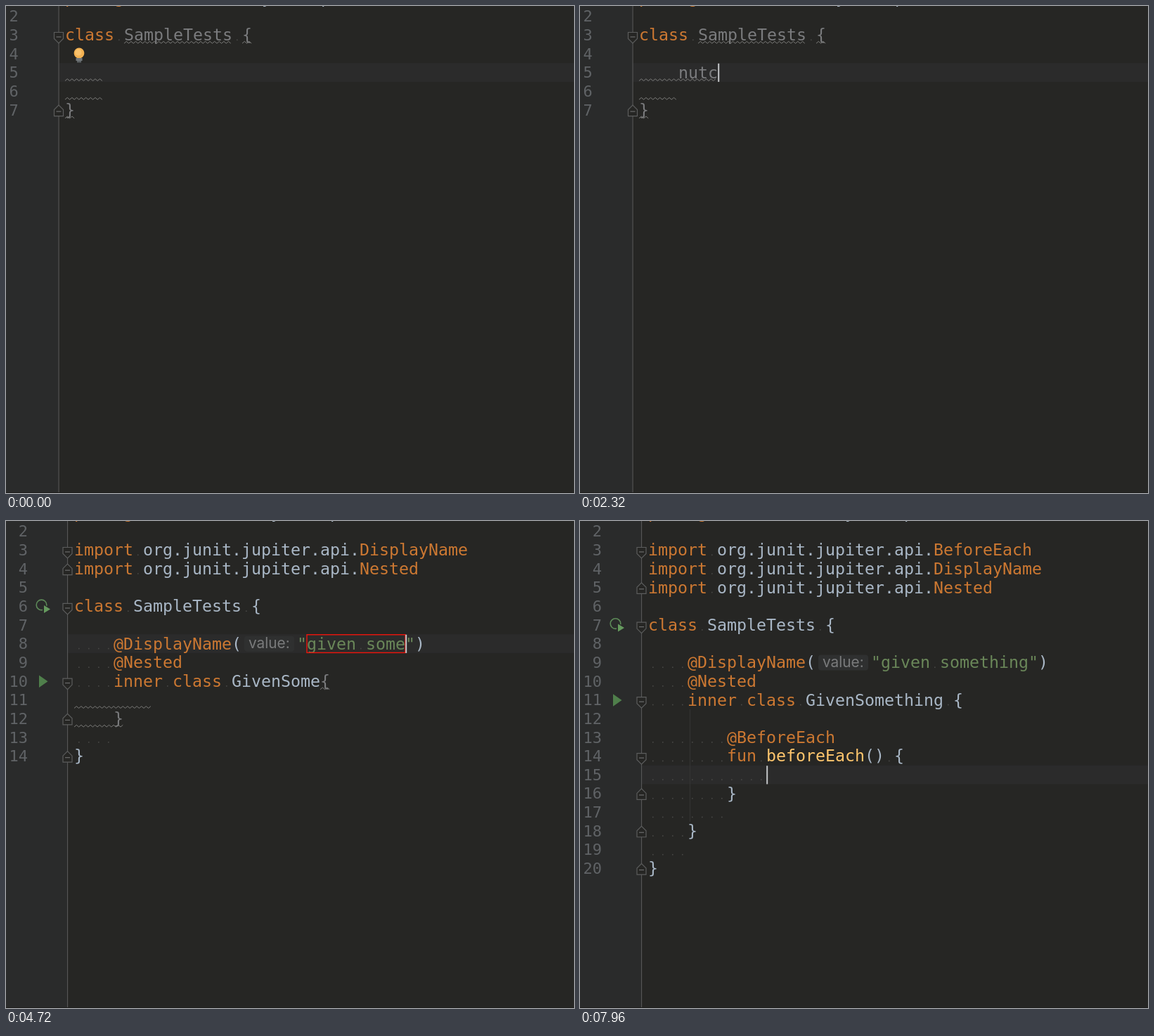
Recreate the animation shown at these times as an HTML page with a canvas. Size 808 by 693 pixels, loop 8000 ms.

```html
<!DOCTYPE html>
<html lang="en">
<head>
<meta charset="utf-8">
<title>Live templates in an editor</title>
<style>
html, body { margin: 0; width: 100%; height: 100%; overflow: hidden; background: #262624; }
canvas { display: block; width: 808px; height: 693px; }
</style>
</head>
<body>
<canvas id="stage" width="808" height="693"></canvas>
<script>
const ctx = document.getElementById('stage').getContext('2d');
const LOOP = 8000, CELL = 14, ROW = 26.65, HINT_WIDTH = 79;
const MONO = '"DejaVu Sans Mono", monospace', SANS = 'Inter, sans-serif';
const CODE = `23.25px ${MONO}`;
const BG = '#262624', GUTTER = '#2a2b2b', CURRENT = '#2b2b2b';
const COLORS = { o: '#cc7832', t: '#a9b7c6', g: '#7b7c7e', s: '#6a8759', f: '#ffc66d' };

// Each entry is the time at which one more character is there.
const TYPED = {
  nutc: [520, 640, 760, 880],
  'given something': [3360, 3440, 3560, 3680, 3760, 3880, 4120, 4320, 4400, 4480, 5040, 5240, 5320, 5400, 5480],
  be: [6880, 7160]
};
const typed = (word, t) => word.slice(0, TYPED[word].filter(at => at <= t).length);
const camel = words => words.split(' ').map(w => w.charAt(0).toUpperCase() + w.slice(1)).join('');
const line = (text, extra) => ({ text, ...extra });
const importLine = (name, fold) => line(`~oimport ~torg.junit.jupiter.api.~o${name}`, { fold });

const HEAD = [line('~opackage ~tcom.workdiary.toolpad'), line('')];

function firstScene(t) {
  const word = typed('nutc', t), col = 4 + word.length;
  const rows = [['nutc', 'Creates a new nested unit test class']];
  if (t < 880) rows.push(['nut', 'Creates a new unit test']);
  return {
    gutter: 75, left: 84,
    lines: [...HEAD,
      line('~oclass ~gSampleTests {', { fold: 'down', waves: [[6, 17], [18, 19]] }),
      line(''),
      line('    ~g' + word, { waves: [[0, col]] }),
      line('    ', { waves: [[0, 4]] }),
      line('~g}', { fold: 'up', waves: [[0, 1]] })],
    caret: { row: 5, col, on: t >= 320 },
    bulb: t < 520 ? [104, 69] : t >= 1400 && t < 2240 ? [766, 120] : null,
    popup: t >= 600 && t < 2240 && {
      x: 96, y: 108, w: 684, textX: 140, descX: 265, rows, match: word.length, size: 15.9,
      hint: '^↓ and ^↑ will move caret down and up in the editor', linkX: 495
    }
  };
}

function secondScene(t) {
  const words = typed('given something', t), name = camel(words);
  const done = t >= 5640, expanded = t >= 7480, settled = t >= 7800;
  const inlay = t >= 2640 ? '\t' : '', known = t >= 4600;
  const abbr = typed('be', t);
  const blank = { waves: [[0, 8]] };
  const dim = settled ? '~t' : '~g';

  const imports = [importLine('DisplayName', expanded ? '' : 'down'), importLine('Nested', 'up')];
  if (expanded) imports.unshift(importLine('BeforeEach', 'down'));

  const brace = 16 + name.length + (done ? 1 : 0);
  const braceWaves = settled ? [] : [[brace, brace + 1]];
  if (!name) braceWaves.push([15, 16, '#a35a32']);

  let body;
  if (expanded) {
    body = [line(''), line('        ~o@BeforeEach'),
      line('        ~ofun ~fbeforeEach~t() {', { fold: 'down' }),
      line(' '.repeat(12)), line('        ~t}', { fold: 'up' }), line(' '.repeat(8))];
  } else {
    body = [line(' '.repeat(8), blank)];
    if (t >= 6200) body.push(line('        ~g' + abbr, { waves: [[0, 8 + abbr.length]] }));
    if (t >= 6400) body.push(line(' '.repeat(8), blank));
  }

  const lines = [...HEAD, ...imports, line(''),
    line(`~oclass ${known ? '~t' : '~g'}SampleTests ~t{`,
      { fold: 'down', icon: known && 'class', waves: known ? [] : [[6, 17]] }),
    line(''),
    line(`    ~o@DisplayName~t(${inlay}~s"${words}"~t)`),
    line('    ~o@Nested'),
    line(`    ~oinner class ~t${name}${done ? ' ' : ''}${dim}{`,
      { fold: 'down', icon: known && 'run', waves: braceWaves }),
    ...body,
    line(`    ${dim}}`, { fold: 'up', waves: settled ? [] : [[0, 5]] }),
    line('    '), line('~t}', { fold: 'up' })];

  const quoteEnd = 18 + inlay.length;
  let caret = { row: 8, col: quoteEnd + words.length };
  if (expanded) caret = { row: 15, col: 12 };
  else if (t >= 6600) caret = { row: 12, col: 8 + abbr.length };
  else if (t >= 6400) caret = { row: 13, col: 8 };
  else if (t >= 6200) caret = { row: 12, col: 8 };
  else if (done) caret = { row: 11, col: 8 };
  caret.on = true;

  return {
    gutter: 87.5, left: 97, lines, caret,
    field: !done && quoteEnd,
    guide: expanded && [12, 17],
    popup: t >= 6960 && t < 7400 && {
      x: 196, y: 294.5, w: 640, textX: 209, descX: 391, match: abbr.length, size: 15.4,
      rows: [['be', 'Creates a before each function']],
      hint: 'Press ^. to choose the selected (or first) suggestion and insert a dot afterwards', linkX: 783
    }
  };
}

const topOf = row => 28 + (row - 3) * ROW;

function box(color, x, y, w, h) {
  ctx.fillStyle = color;
  ctx.fillRect(x, y, w, h);
}

function label(text, x, y, color, font = CODE) {
  ctx.font = font;
  ctx.fillStyle = color;
  ctx.fillText(text, x, y);
}

function polygon(points, fill, stroke) {
  ctx.beginPath();
  points.forEach(([x, y]) => ctx.lineTo(x, y));
  ctx.closePath();
  ctx.fillStyle = fill;
  ctx.fill();
  if (stroke) {
    ctx.strokeStyle = stroke;
    ctx.lineWidth = 1.2;
    ctx.stroke();
  }
}

function disc(x, y, r, color) {
  ctx.beginPath();
  ctx.arc(x, y, r, 0, 7);
  ctx.fillStyle = color;
  ctx.fill();
}

function wave(x0, x1, y, color = '#7c7c7a') {
  const step = 3.3;
  ctx.beginPath();
  for (let x = x0, i = 0; x <= x1; x += step, i++) ctx.lineTo(x, y + (i % 2 ? 0 : 2.8));
  ctx.strokeStyle = color;
  ctx.lineWidth = 1;
  ctx.stroke();
}

function foldMark(kind, x, top) {
  const down = kind === 'down', flat = top + (down ? 9.5 : 22), dir = down ? 1 : -1;
  polygon([[x - 6.5, flat], [x + 6.5, flat], [x + 6.5, flat + 9 * dir],
    [x, flat + 15.5 * dir], [x - 6.5, flat + 9 * dir]], BG, '#5c5d5d');
  box('#6a6b6b', x - 3.5, flat + 6.5 * dir - 0.6, 7, 1.2);
}

function runIcon(kind, top) {
  if (kind === 'run') {
    polygon([[47, top + 5], [59.5, top + 13.7], [47, top + 22.5]], '#4f7f4b');
    return;
  }
  ctx.beginPath();
  ctx.arc(50.5, top + 11.5, 7.3, 0, 7);
  ctx.strokeStyle = '#5d8a58';
  ctx.lineWidth = 1.6;
  ctx.stroke();
  polygon([[52, top + 9], [65, top + 17.5], [52, top + 25]], GUTTER);
  polygon([[54, top + 12], [63, top + 17.5], [54, top + 23]], '#659a5e');
}

function bulb([x, y]) {
  disc(x, y - 2, 7.4, '#f4b252');
  disc(x - 1, y - 3, 4.5, '#fac26c');
  box('#73787b', x - 4.5, y + 5, 9, 4);
  box('#5d6265', x - 3, y + 9, 6, 2.5);
}

const plain = text => text.replace(/~\w/g, '');
const xAt = (text, col, left) =>
  [...plain(text).slice(0, col)].reduce((x, c) => x + (c === '\t' ? HINT_WIDTH : CELL), left);

function codeText(text, left, top, dots) {
  let x = left, color = COLORS.t;
  text.split(/(~\w|\t)/).forEach(part => {
    if (part[0] === '~') {
      color = COLORS[part[1]];
    } else if (part === '\t') {
      ctx.beginPath();
      ctx.roundRect(x + 4, top + 2.5, 71, 22, 4);
      ctx.fillStyle = '#2f3030';
      ctx.fill();
      label('value:', x + 10, top + 20, '#7a7b7c', `20.8px ${SANS}`);
      x += HINT_WIDTH;
    } else {
      label(part, x, top + 21.3, color);
      [...part].forEach((c, i) => {
        if (c === ' ' && dots) box('#484846', x + i * CELL + 6, top + 19.5, 1.6, 1.6);
      });
      x += part.length * CELL;
    }
  });
}

function popup({ x, y, w, textX, descX, rows, match, size, hint, linkX }) {
  rows.forEach(([word, desc], i) => {
    const top = y + i * 27;
    box(i ? '#38393b' : '#464749', x, top, w, 27.5);
    label(word, textX, top + 22.3, '#8b8c8d');
    label(word.slice(0, match), textX, top + 22.3, '#9567a0');
    label(desc, descX, top + 22.3, '#8b8c8d');
  });
  const top = y + rows.length * 27;
  box('#35383a', x, top, w, 23.5);
  const font = `${size}px ${SANS}`, base = top + 18;
  label(hint, x + 2, base, '#c3c5c7', font);
  label('>>', linkX, base, '#5c8fdb', font);
  box('#5c8fdb', linkX, base + 2, 19, 1.2);
}

function draw(t) {
  const scene = t < 2480 ? firstScene(t) : secondScene(t);
  const { gutter, left, lines, caret, field, guide } = scene;
  box(BG, 0, 0, 808, 693);
  box(GUTTER, 0, 0, gutter, 693);
  box(CURRENT, gutter, topOf(caret.row), 808, ROW);
  box('#565757', gutter - 0.5, 0, 1.1, 693);
  if (guide) box('#343433', left + 59, topOf(guide[0]), 1, topOf(guide[1] + 1) - topOf(guide[0]));

  const digits = String(lines.length).length;
  lines.forEach(({ text, fold, icon, waves = [] }, i) => {
    const top = topOf(i + 1), number = String(i + 1);
    label(number, 4.5 + (digits - number.length) * 13.2, top + 21, '#606366', `22px ${MONO}`);
    codeText(text, left, top, !waves.some(w => w[0] === 0));
    waves.forEach(([a, b, color]) => wave(left + a * CELL, left + b * CELL, top + 22.4, color));
    if (fold) foldMark(fold, gutter, top);
    if (icon) runIcon(icon, top);
  });

  const text = lines[caret.row - 1].text, top = topOf(caret.row);
  const caretX = xAt(text, caret.col, left);
  if (field) {
    const start = xAt(text, field, left);
    ctx.strokeStyle = '#f0140c';
    ctx.lineWidth = 1.4;
    ctx.strokeRect(start, top + 0.5, Math.max(caretX - start, 0.5), ROW - 1);
  }
  if (caret.on) box('#c4c6c8', caretX + 0.2, top + 0.5, 2, ROW - 0.5);
  if (scene.popup) popup(scene.popup);
  if (scene.bulb) bulb(scene.bulb);
  box('#1d1d1c', 0, 692, 808, 1);
}

const start = performance.now();
function tick() {
  draw((performance.now() - start) % LOOP);
  requestAnimationFrame(tick);
}
tick();
</script>
</body>
</html>
```
